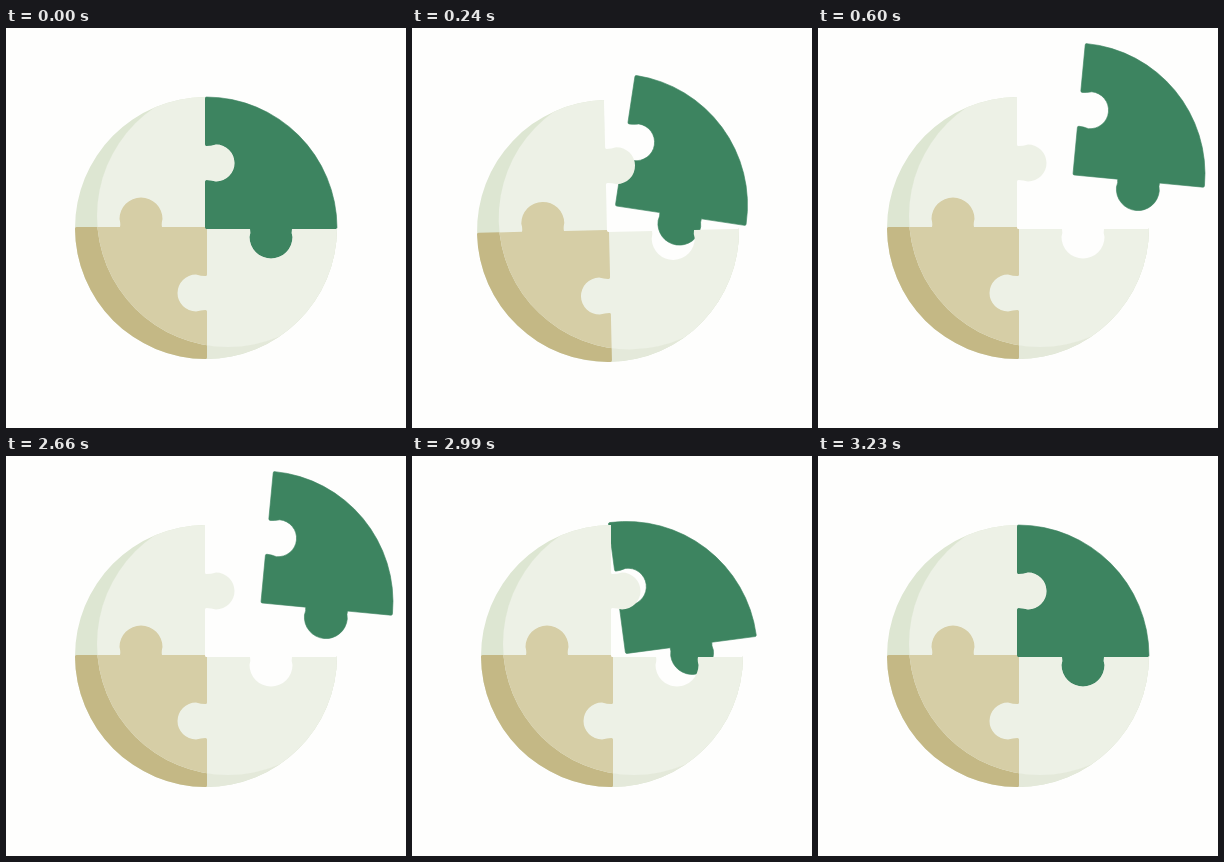
Write an HTML page that moves like this. It is 400 px wide and 400 px high and loops after 3.76 s.

```html
<!DOCTYPE html>
<html lang="en">
<head>
<meta charset="utf-8">
<title>Puzzle pie</title>
<style>
  html, body { margin: 0; height: 100%; overflow: hidden; background: #fefefd; }
  svg { display: block; width: 100%; height: 100%; }
</style>
</head>
<body>
<svg viewBox="0 0 400 400">
  <defs>
    <path id="piece" d="M200.5 69A131 131 0 0 1 331 199.5Q331 201 329.5 201H286
      Q285.2 204 286.5 209A21.5 21.5 0 0 1 243.5 209Q244.8 204 244 201H200.5Q199 201 199 199.5
      V153.5Q199 152 200.5 152Q205 152 210 153.5A18.5 18.5 0 0 0 210 116.5
      Q205 118 200.5 118Q199 118 199 116.5V70.5Q199 69 200.5 69Z"/>
    <path id="base" d="M199 69A131 131 0 1 0 331 201H240V100H199Z"/>
    <use id="turned" href="#piece" transform="rotate(180 200 200)"/>
    <clipPath id="lit"><circle cx="222" cy="188" r="131"/></clipPath>
    <mask id="hole">
      <rect width="400" height="400" fill="#fff"/>
      <use href="#piece"/>
    </mask>
  </defs>
  <use id="wedge" href="#piece" fill="#3d8460" stroke="#3d8460" stroke-width=".6"/>
  <g id="disc" mask="url(#hole)">
    <use href="#base" fill="#dde6d2"/>
    <path d="M200 200H331A131 131 0 0 1 200 331Z" fill="#e4e9da"/>
    <use href="#turned" fill="#c4b885"/>
    <g clip-path="url(#lit)">
      <use href="#base" fill="#edf1e6"/>
      <use href="#turned" fill="#d6cea6"/>
    </g>
  </g>
</svg>
<script>
  const LOOP = 3760, CLOSE = 2660, STEP = 30;
  const rest = [0, 0, 0], recoil = [-24, 17.6, -8], away = [56, -54, 5.4];

  // Each key: time, then x, y and rotation.
  const wedgeKeys = [
    [0, ...rest], [135, ...recoil], [240, 4.5, -23, 8.6], [600, ...away],
    [CLOSE, ...away], [2900, 49.5, -23, -8.6], [3080, -22, 14, -6.4],
    [3125, ...recoil], [3200, -12, 8.8, -4], [3230, ...rest], [LOOP, ...rest]
  ];
  const discKeys = [
    [0, ...rest], [135, ...recoil], [240, -4, 2.9, -1.3], [285, ...rest],
    [3000, ...rest], [3080, -21.5, 15.5, -7.2],
    [3125, ...recoil], [3200, -12, 8.8, -4], [3230, ...rest], [LOOP, ...rest]
  ];

  const slope = (a, b, c) => (b[c] - a[c]) / (b[0] - a[0]);

  // Tangent that never overshoots: zero at ends and turning points.
  function tangent(keys, i, c) {
    if (!i || i === keys.length - 1) return 0;
    const p = slope(keys[i - 1], keys[i], c), q = slope(keys[i], keys[i + 1], c);
    return p * q > 0 ? 2 * p * q / (p + q) : 0;
  }

  function sample(keys, t, c) {
    const i = keys.findIndex(k => k[0] > t) - 1;
    const a = keys[i], b = keys[i + 1], d = b[0] - a[0], u = (t - a[0]) / d, v = 1 - u;
    return a[c] * v * v * (1 + 2 * u) + b[c] * u * u * (3 - 2 * u)
      + d * u * v * (v * tangent(keys, i, c) - u * tangent(keys, i + 1, c));
  }

  function pose(id, keys, t) {
    const [x, y, r] = [1, 2, 3].map(c => sample(keys, t, c));
    document.getElementById(id).setAttribute('transform', `translate(${x} ${y}) rotate(${r} 200 200)`);
  }

  const start = performance.now();
  function frame(now) {
    let t = Math.max(0, now - start) % LOOP;
    t -= (t < CLOSE ? t : t - CLOSE) % STEP;
    pose('wedge', wedgeKeys, t);
    pose('disc', discKeys, t);
    requestAnimationFrame(frame);
  }
  frame(start);
</script>
</body>
</html>
```
